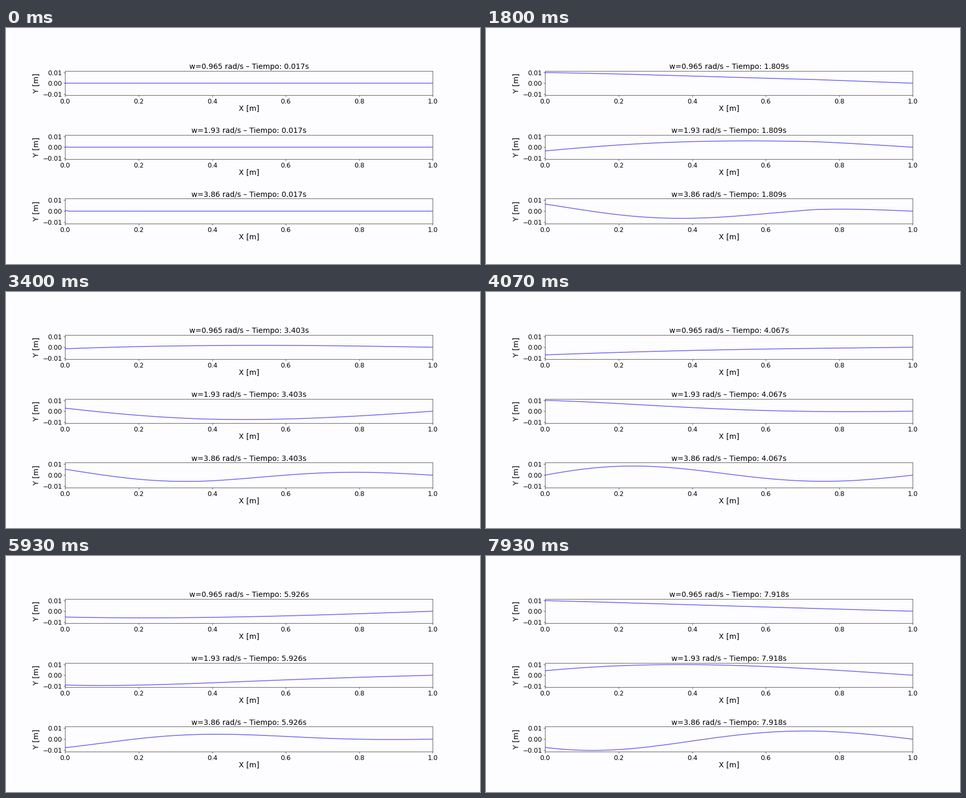
Animation, 900 px wide and 450 px high, one loop 8000 ms. Source, as a matplotlib script:

```python
import numpy as np
import matplotlib.pyplot as plt
from matplotlib.animation import FuncAnimation

W, H = 900, 450
STATES = 120                    # distinct pictures in one loop
TICKS, TICK_MS = 400, 20        # each picture lasts 3 or 4 ticks
STRIDE = 4                      # simulation steps per picture
DT, CELLS = 0.0166, 85
SPEED, DAMPING, AMP = 0.7, 1.5, 0.01
BG, BLUE, EDGE = "#fdfcfe", "#7069f2", "#15151c"
LEFT, RIGHT = 112.4, 810.4

plt.rcParams["font.family"] = "DejaVu Sans"

# angular frequency, box top, box bottom, y limit
PANELS = [
    (0.965, 82.3, 128.3, 0.0111),
    (1.93, 204.3, 250.3, 0.0111),
    (3.86, 325.3, 373.3, 0.0115),
]


def simulate(w):
    """Damped string, driven at the left end and fixed at the right."""
    r2 = (SPEED * DT * CELLS) ** 2
    d = DAMPING * DT / 2
    old, u = np.zeros(CELLS + 1), np.zeros(CELLS + 1)
    u[0] = AMP * np.sin(w * DT)
    states = [u]
    for step in range(2, STRIDE * STATES):
        new = np.zeros_like(u)
        bend = u[2:] - 2 * u[1:-1] + u[:-2]
        new[1:-1] = (2 * u[1:-1] - (1 - d) * old[1:-1] + r2 * bend) / (1 + d)
        new[0] = AMP * np.sin(w * step * DT)
        old, u = u, new
        states.append(u)
    return states[::STRIDE]


fig = plt.figure(figsize=(W / 72, H / 72), dpi=72, facecolor=BG)


def put(x, y, text, **kw):
    return fig.text(x / W, 1 - y / H, text, fontsize=14, ha="center", **kw)


def make_panel(w, top, bottom, ylim):
    ax = fig.add_axes([LEFT / W, 1 - bottom / H,
                       (RIGHT - LEFT) / W, (bottom - top) / H], facecolor=BG)
    ax.set(xlim=(0, 1), ylim=(-ylim, ylim), yticks=[-0.01, 0, 0.01])
    ax.tick_params(labelsize=12.3, length=2.9, width=0.67, pad=2.7, color=EDGE)
    for spine in ax.spines.values():
        spine.set(linewidth=0.67, color=EDGE)
    cx, cy = (LEFT + RIGHT) / 2, (top + bottom) / 2
    put(cx, bottom + 30, "X [m]", va="baseline")
    put(58.3, cy, "Y [m]", va="center", rotation=90)
    title = put(cx, cy - 27.2, "", va="baseline")
    line, = ax.plot([], [], color=BLUE, lw=1.6)
    return title, line, w, simulate(w)


x = np.linspace(0, 1, CELLS + 1)
panels = [make_panel(*p) for p in PANELS]


def draw(tick):
    i = (3 * tick + 2) // 10
    t = DT * (STRIDE * i + 1)
    for title, line, w, states in panels:
        title.set_text(f"w={w} rad/s – Tiempo: {t:.3f}s")
        line.set_data(x, states[i])
    return [a for p in panels for a in p[:2]]


anim = FuncAnimation(fig, draw, frames=TICKS, interval=TICK_MS,
                     init_func=lambda: draw(0), repeat=True, repeat_delay=0)
plt.show()
```
